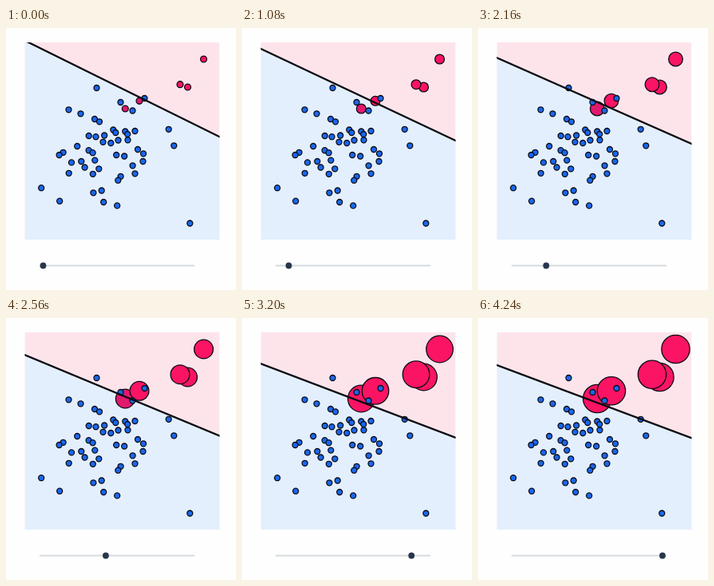
Recreate the animation shown at these times as an HTML page with a canvas. Size 288 by 328 pixels, loop 4.28 s.

```html
<!DOCTYPE html>
<html lang="en">
<head>
<meta charset="utf-8">
<title>Weighted classes</title>
<style>
html, body { margin: 0; width: 100%; height: 100%; overflow: hidden; background: #fefefe; }
canvas { display: block; width: 288px; height: 328px; }
</style>
</head>
<body>
<canvas id="stage" width="288" height="328"></canvas>
<script>
const ctx = document.getElementById('stage').getContext('2d');
const LOOP = 4280;
const BOX = { l: 23.5, t: 18, r: 267.5, b: 265 };
const TAU = Math.PI * 2;

const minor = [[247.5, 39], [227.5, 74], [218, 70.7], [149.3, 101], [167, 91.3]];
const major = [
  [113.5, 75], [143.5, 93], [173.5, 88], [158.5, 103.5], [78.5, 102.3], [93.5, 107.3],
  [111, 114], [117, 117.3], [203.7, 126.8], [210.3, 147.3], [134.3, 127.5], [137.3, 131],
  [149.3, 129.5], [152.2, 133], [161.5, 129], [152.5, 140.3], [140.5, 140.5], [103.7, 135],
  [112.5, 136.2], [123.2, 134.5], [121.5, 142.8], [131.3, 144], [89.2, 148], [103.6, 153.2],
  [108.6, 156.2], [71.6, 155.8], [66.6, 159], [82, 168.4], [94.3, 167], [111.3, 165.6],
  [98.6, 174.5], [116.3, 176.3], [108.8, 182.8], [78.7, 181.8], [138.2, 159], [148.2, 160.5],
  [165, 152], [172, 157.3], [171.5, 167], [158.6, 172.3], [161.5, 182.3], [143.6, 185.8],
  [140.3, 190.7], [44.2, 200.2], [67.2, 216.7], [109.4, 206.3], [119.7, 203.5], [122.2, 218],
  [139.2, 222.4], [230.3, 244.5]
];

function ramp(t, from, to) {
  const u = Math.min(1, Math.max(0, (t - from) / (to - from)));
  return (u + u * u * (3 - 2 * u)) / 2;
}

// class weight: 1, then 5, then 20
const weightAt = t => 1 + 4 * ramp(t, 680, 1840) + 15 * ramp(t, 2170, 3420);

function dot(x, y, r, fill, line) {
  ctx.beginPath();
  ctx.arc(x, y, r, 0, TAU);
  ctx.fillStyle = fill;
  ctx.fill();
  if (line) {
    ctx.lineWidth = line;
    ctx.strokeStyle = '#0b0b14';
    ctx.stroke();
  }
}

function segment(x1, y1, x2, y2, width, color) {
  ctx.beginPath();
  ctx.moveTo(x1, y1);
  ctx.lineTo(x2, y2);
  ctx.lineWidth = width;
  ctx.strokeStyle = color;
  ctx.stroke();
}

function draw(t) {
  const w = weightAt(t);
  const k = Math.log(w);
  const left = 15.7 + 12.25 * k + 0.726 * k * k;
  const right = 136.2 + 6.4 * k - 0.575 * k * k;
  const slope = (right - left) / (BOX.r - BOX.l);

  ctx.fillStyle = '#fefefe';
  ctx.fillRect(0, 0, 288, 328);

  ctx.save();
  ctx.beginPath();
  ctx.rect(BOX.l, BOX.t, BOX.r - BOX.l, BOX.b - BOX.t);
  ctx.clip();
  ctx.fillStyle = '#fde4eb';
  ctx.fillRect(BOX.l, BOX.t, BOX.r - BOX.l, BOX.b - BOX.t);
  ctx.beginPath();
  ctx.moveTo(BOX.l, left);
  ctx.lineTo(BOX.r, right);
  ctx.lineTo(BOX.r, BOX.b);
  ctx.lineTo(BOX.l, BOX.b);
  ctx.fillStyle = '#e4effe';
  ctx.fill();

  const r = 3.95 * Math.sqrt(w);
  for (const [x, y] of minor) {
    const missed = y > left + slope * (x - BOX.l);
    dot(x, y, r, missed ? '#e0196f' : '#fb1464', 1.3);
  }
  for (const [x, y] of major) dot(x, y, 3.5, '#1967ee', 1.3);
  segment(BOX.l - 5, left - 5 * slope, BOX.r + 5, right + 5 * slope, 2.3, '#0b0b10');
  ctx.restore();

  segment(42, 297.5, 236, 297.5, 2, '#d5dbe0');
  dot(46.5 + 184.5 * (w - 1) / 19, 297.5, 3.9, '#28364c');
}

const start = performance.now();
function tick(now) {
  const t = Math.max(0, now - start) % LOOP;
  draw(Math.floor(t / 40) * 40);
  requestAnimationFrame(tick);
}
draw(0);
requestAnimationFrame(tick);
</script>
</body>
</html>
```
